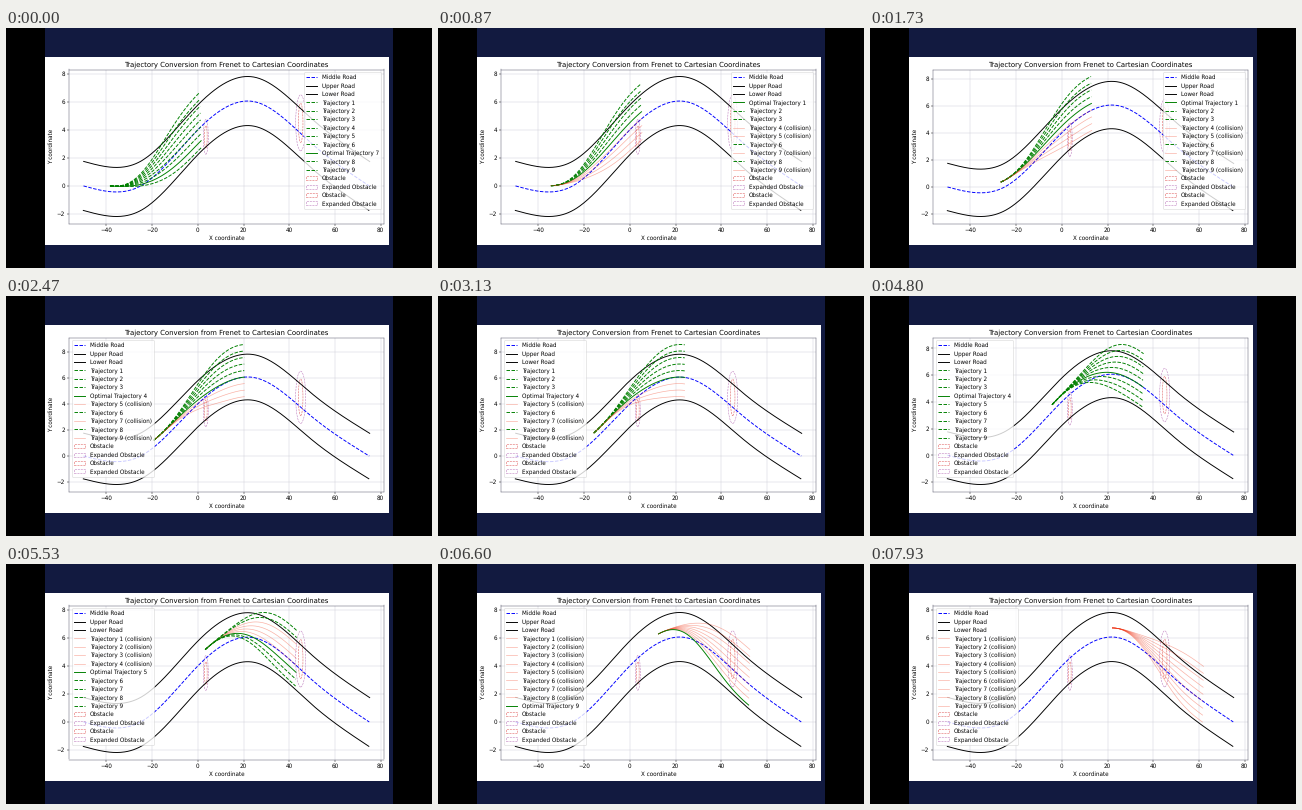
A matplotlib script for the animation above (8 s loop, 426 by 240 pixels).

```python
import numpy as np
import matplotlib.pyplot as plt
from matplotlib.animation import FuncAnimation
from matplotlib.patches import Ellipse, Rectangle

W, H, DPI = 426, 240, 40
FRAMES, INTERVAL = 80, 100
FRAMES_PER_STEP = 5
HORIZON = 39.6
HALF_ROAD = 1.75

plt.rcParams.update({
    "font.family": "DejaVu Sans", "font.size": 10.1, "text.hinting": "none",
    "axes.titlesize": 12.27, "axes.linewidth": 0.7, "axes.edgecolor": "#303048",
    "lines.linewidth": 1.7, "grid.color": "#c6c6d2", "grid.linewidth": 0.7,
    "legend.labelspacing": 0.464})

# Lateral goals, in order of trajectory number
GOALS = [0.5, 1, 1.5, 0, -0.5, 2, -1, 2.5, -1.5]

# Planner state at a few steps: horizon end and lateral offset at the start
STEPS = [0, 3, 6, 8, 11, 13, 16]
ENDS = [1.3, 13, 24, 31.7, 43, 52.2, 61.7]
OFFSETS = [0.41, 0.5, 0.55, 0.45, 0.65, 0.64, 0.65]

# Centre, half size and half size with safety margin
OBSTACLES = [((3.5, 3.5), (0.6, 0.8), (1.1, 1.24)),
             ((45, 4.5), (1.0, 1.4), (2.2, 2.0))]

KNOT_X = np.linspace(-50, 75, 6)
KNOT_Y = np.array([0, 0, 4, 6, 3, 0.0])
GAP = KNOT_X[1] - KNOT_X[0]
BEND = np.zeros(6)
BEND[1:-1] = np.linalg.solve(4 * np.eye(4) + np.eye(4, k=1) + np.eye(4, k=-1),
                             np.diff(KNOT_Y, 2))


def road(x):
    """Height and slope of the natural cubic spline through the knots."""
    i = np.clip(((x - KNOT_X[0]) // GAP).astype(int), 0, 4)
    u = (x - KNOT_X[i]) / GAP
    v = 1 - u
    a, b = BEND[i], BEND[i + 1]
    p, q = KNOT_Y[i] - a, KNOT_Y[i + 1] - b
    y = a * v**3 + b * u**3 + p * v + q * u
    slope = (-3 * a * v**2 + 3 * b * u**2 - p + q) / GAP
    return y, slope


def to_cartesian(x, d):
    """Shift the road centre by d along its normal."""
    y, slope = road(x)
    n = np.hypot(1, slope)
    return x - d * slope / n, y + d / n


def trajectory(start, d0, goal):
    u = np.linspace(0, 1, 120)
    blend = u**3 * (10 - 15 * u + 6 * u**2)
    return to_cartesian(start + HORIZON * u, d0 + (goal - d0) * blend)


def collides(path):
    x, y = path
    return any(np.any(((x - cx) / rx)**2 + ((y - cy) / ry)**2 < 1)
               for (cx, cy), _, (rx, ry) in OBSTACLES)


def ellipse(centre, half, color, alpha, label):
    ax.add_patch(Ellipse(centre, 2 * half[0], 2 * half[1], fill=False,
                         edgecolor=color, alpha=alpha, linestyle="--",
                         label=label))


fig = plt.figure(figsize=(W / DPI, H / DPI), dpi=DPI, facecolor="black")
back = fig.add_axes([0, 0, 1, 1], zorder=-1)
back.set(xlim=(0, W), ylim=(H, 0))
back.axis("off")
back.add_patch(Rectangle((39, 0), 348, H, color="#121a40", lw=0))
back.add_patch(Rectangle((39, 29), 344, 188, color="white", lw=0))
ax = fig.add_axes([63 / W, 1 - 195.5 / H, 315 / W, 154 / H])

ROAD_X = np.linspace(-50, 75, 300)
MIDDLE, UPPER, LOWER = (to_cartesian(ROAD_X, d)
                        for d in (0, HALF_ROAD, -HALF_ROAD))


def draw(i):
    step = (i + 1) // FRAMES_PER_STEP
    start = np.interp(step, STEPS, ENDS) - HORIZON
    d0 = np.interp(step, STEPS, OFFSETS)
    paths = [trajectory(start, d0, g) for g in GOALS]
    hits = [collides(p) for p in paths]
    wish = -1 if start < -20 else 0
    free = [n for n in range(len(GOALS)) if not hits[n]]
    best = min(free, key=lambda n: abs(GOALS[n] - wish), default=None)

    ax.clear()
    ax.plot(*MIDDLE, "b--", label="Middle Road")
    ax.plot(*UPPER, "k-", label="Upper Road")
    ax.plot(*LOWER, "k-", label="Lower Road")
    for n, path in enumerate(paths):
        name = f"Trajectory {n + 1}"
        if hits[n]:
            ax.plot(*path, "-", color="#f03010", alpha=0.38, lw=1.2,
                    label=name + " (collision)")
        elif n == best:
            ax.plot(*path, "g-", label="Optimal " + name)
        else:
            ax.plot(*path, "g--", label=name)
    for centre, half, wide in OBSTACLES:
        ellipse(centre, half, "#d01010", 0.65, "Obstacle")
        ellipse(centre, wide, "purple", 0.5, "Expanded Obstacle")

    low = LOWER[1].min()
    high = max(UPPER[1].max(), max(p[1].max() for p in paths))
    pad = 0.05 * (high - low)
    ax.set(xlim=(-56.34, 81.45), ylim=(low - pad, high + pad),
           xticks=range(-40, 81, 20), yticks=range(-2, 9, 2),
           xlabel="X coordinate", ylabel="Y coordinate",
           title="Trajectory Conversion from Frenet to Cartesian Coordinates")
    ax.grid(True)
    ax.legend(loc="upper right" if start < -20 else "upper left")
    return []


anim = FuncAnimation(fig, draw, frames=FRAMES, init_func=lambda: draw(0),
                     interval=INTERVAL, repeat=True, repeat_delay=0)
plt.show()
```
